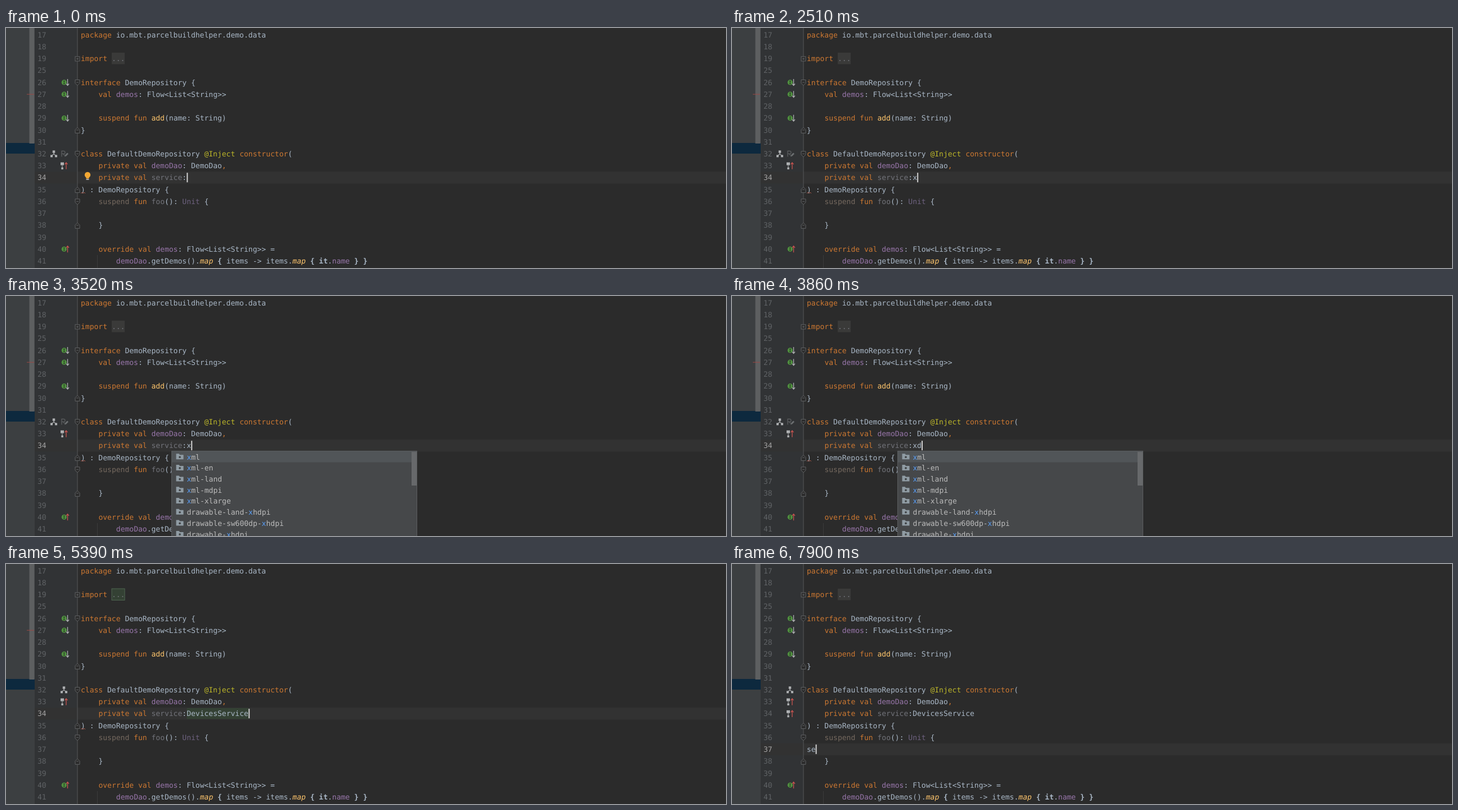
An HTML page that plays this animation: 1280 by 428 pixels, repeating every 8 s.

```html
<!DOCTYPE html>
<html lang="en">
<head>
<meta charset="utf-8">
<title>Code editor</title>
<style>
  html, body { margin: 0; width: 100%; height: 100%; overflow: hidden; background: #2b2b2b; }
  svg { display: block; width: 100vw; height: 100vh; }
  text { white-space: pre; text-rendering: geometricPrecision; }
  .code { font: 13.039px "DejaVu Sans Mono", monospace; }
  .hint { font: 8.72px "Open Sans", sans-serif; }
  .t { fill: #a9b7c6; }
  .k { fill: #cc7832; }
  .p { fill: #9876aa; }
  .f { fill: #ffc66d; }
  .a { fill: #bbb529; }
  .u { fill: #72737a; }
  .d { fill: #75695f; }
  .n { fill: #6e6280; }
  .i { fill: #ffc66d; font-style: italic; }
  .b { fill: #a9b7c6; font-weight: bold; }
  .w { fill: #bbbbbb; }
  .m { fill: #589df6; }
  .l { fill: #606366; }
  .c { fill: #a4a3a3; }
</style>
</head>
<body>
<svg id="stage" viewBox="0 0 1280 428" preserveAspectRatio="none"></svg>
<script>
const LOOP = 8000, CHAR = 7.85, LEFT = 133, PITCH = 21.24, POP_X = 294, POP_W = 437;

// Line number, indent in columns, then segments: a style letter followed by text.
const LINES = [
  [17, 0, 'kpackage |tio.mbt.parcelbuildhelper.demo.data'],
  [18], [19, 0, 'kimport '], [25],
  [26, 0, 'kinterface |tDemoRepository {'],
  [27, 4, 'kval |pdemos|t: Flow<List<String>>'],
  [28],
  [29, 4, 'ksuspend fun |fadd|t(name: String)'],
  [30, 0, 't}'], [31],
  [32, 0, 'kclass |tDefaultDemoRepository |a@Inject |kconstructor|t('],
  [33, 4, 'kprivate val |pdemoDao|t: DemoDao|k,'],
  [34, 4, 'kprivate val |uservice|t:'],
  [35, 0, 't) : DemoRepository {'],
  [36, 4, 'dsuspend |kfun |ufoo|t(): |nUnit |t{'],
  [37, 0, 't'], [38, 4, 't}'], [39],
  [40, 4, 'koverride val |pdemos|t: Flow<List<String>> ='],
  [41, 8, 'pdemoDao|t.getDemos().|imap |b{ |titems -> items.|imap |b{ it|t.|pname|b } }']
];

const FOLDERS = ['mx|wml', 'mx|wml-en', 'mx|wml-land', 'mx|wml-mdpi', 'mx|wml-xlarge',
  'wdrawable-land-|mx|whdpi', 'wdrawable-sw600dp-|mx|whdpi', 'wdrawable-|mx|whdpi'];

// Each step changes only the listed properties.
const STEPS = [
  [0, { line: 34, col: 24, caret: 1, bulb: 1, typed: '', body: '', popup: '', error: 1, usage: 0, moved: 0, linked: 0 }],
  [330, { caret: 0 }],
  [460, { bulb: 0 }],
  [860, { caret: 1 }],
  [990, { bulb: 1 }],
  [1460, { caret: 0 }],
  [1980, { caret: 1 }],
  [2510, { typed: 'x', col: 25, bulb: 0 }],
  [2990, { caret: 0, popup: 'short' }],
  [3070, { popup: 'long' }],
  [3520, { caret: 1 }],
  [3860, { typed: 'xd', col: 26 }],
  [3930, { typed: 'xde', col: 27 }],
  [4000, { popup: 'route' }],
  [4200, { typed: 'xdev', col: 28 }],
  [5060, { caret: 0 }],
  [5390, { typed: 'DevicesService', col: 38, caret: 1, popup: '', usage: 1, moved: 1 }],
  [5720, { linked: 1 }],
  [5850, { error: 0 }],
  [6380, { caret: 0 }],
  [6510, { bulb: 1 }],
  [6840, { line: 35, col: 20, caret: 1, bulb: 0, usage: 0 }],
  [6980, { line: 36, col: 29 }],
  [7080, { line: 37, col: 0 }],
  [7770, { body: 's', col: 1 }],
  [7900, { body: 'se', col: 2 }]
];

const rowOf = number => LINES.findIndex(line => line[0] === number);
const lineY = number => 12 + PITCH * rowOf(number);
const colX = col => LEFT + col * CHAR;
const escapeText = s => s.replace(/&/g, '&amp;').replace(/</g, '&lt;').replace(/>/g, '&gt;');
const rect = (x, y, w, h, fill, extra = '') =>
  `<rect x="${x}" y="${y}" width="${w}" height="${h}" fill="${fill}" ${extra}/>`;
const path = (d, stroke, width = 1, fill = 'none') =>
  `<path d="${d}" stroke="${stroke}" stroke-width="${width}" fill="${fill}"/>`;
const circle = (x, y, r, fill) => `<circle cx="${x}" cy="${y}" r="${r}" fill="${fill}"/>`;
const at = (x, y, content) => `<g transform="translate(${x} ${y})">${content}</g>`;

function text(x, y, markup, font = 'code') {
  const spans = markup.split('|').map(s => `<tspan class="${s[0]}">${escapeText(s.slice(1))}</tspan>`);
  return `<text class="${font}" x="${x}" y="${y}">${spans.join('')}</text>`;
}

const bulb = (x, y) => at(x, y,
  circle(0, -2, 5.2, '#f2a733') + rect(-2.5, 2, 5, 2.5, '#f2a733') + rect(-2.5, 5, 5, 2, '#a9a9a9'));

const arrow = (x, up) => up
  ? path(`M${x} 6V-5M${x - 2.5} -2.5L${x} -5.5L${x + 2.5} -2.5`, '#c75450', 1.3)
  : path(`M${x} -6V5M${x - 2.5} 2.5L${x} 5.5L${x + 2.5} 2.5`, '#afb1b3', 1.3);

const member = (number, up) => at(0, lineY(number),
  circle(103.3, 0, 4.6, '#4f8f3f') + path('M102 -2.4H104.6M103.3 -2.4V2.4M102 2.4H104.6', '#253522') + arrow(109.5, up));

const injected = number => at(0, lineY(number),
  rect(97, -6, 6, 5, '#afb1b3') + path('M100 -1V4', '#afb1b3') + rect(98.3, 3, 3.5, 3.5, '#afb1b3') + arrow(107, true));

const hierarchy = x => at(x, lineY(32),
  rect(-2.2, -6, 4.4, 4.4, '#afb1b3') + path('M0 -2V0L-4 4M0 0L4 4', '#afb1b3', 1.2) +
  rect(-6, 2, 4, 4, '#afb1b3') + rect(2, 2, 4, 4, '#afb1b3'));

const editMark = () => at(104, lineY(32),
  path('M-5 5V-5H-2Q1 -5 1 -2.5Q1 0 -2 0H-5M-2 0L0 3', '#5c5f61', 1.3) +
  path('M0 5L1 2L5 -2L7 0L3 4Z', 'none', 0, '#6b6e70'));

function foldMark(number, down) {
  const s = down ? 1 : -1;
  return at(127, lineY(number) + .5,
    path(`M-4 ${-5 * s}H4V${s}L0 ${5 * s}L-4 ${s}Z`, '#616365', 1, '#2b2b2b') + path('M-2 -.5H2', '#616365'));
}

function background(s) {
  const y = lineY(s.line);
  return rect(0, 0, 1280, 428, '#2b2b2b') + rect(51, 0, 76, 428, '#313335') +
    rect(0, 0, 51, 428, '#3c3f41') + rect(0, 205, 51, 19, '#0d293e') + rect(41.5, 0, 9, 206, '#5d5f60') +
    (s.error ? rect(37, 117.7, 13, 1, '#9c4844') : '') +
    rect(51, y - 10.7, 1229, 21.2, '#323232') +
    path('M127 0V428', '#56585a') + path('M162.5 405V428', '#3b3b3b');
}

function gutter(s) {
  const minus = at(127, lineY(19) + .5,
    rect(-4, -4, 8, 8, '#2b2b2b', 'stroke="#616365"') + path('M-2 0H2M0 -2V2', '#616365'));
  return [26, 27, 29].map(n => member(n, false)).join('') + member(40, true) +
    hierarchy(s.moved ? 103 : 85) + (s.moved ? '' : editMark()) +
    injected(33) + (s.linked ? injected(34) : '') + minus +
    [26, 32, 36].map(n => foldMark(n, true)).join('') +
    [30, 35, 38].map(n => foldMark(n, false)).join('');
}

function code(s) {
  const added = { 34: s.typed, 37: s.body };
  const fold = rect(188, 44, 23, 20.5, s.usage ? '#344134' : '#3a3a39', s.usage ? 'stroke="#4f6650"' : '') +
    text(colX(7), lineY(19) + 4.6, 'u...');
  const usage = s.usage ? rect(colX(24), lineY(34) - 10, 14 * CHAR, 19.5, '#344134') : '';
  const rows = LINES.map(([number, indent, markup]) => {
    const y = lineY(number) + 4.6;
    return text(56, y, (number === s.line ? 'c' : 'l') + number) +
      (markup ? text(colX(indent), y, markup + (added[number] || '')) : '');
  });
  const wave = s.error ? path('M133 295l2 -2l2 2l2 -2l2 2', '#a6584b') : '';
  return fold + usage + rows.join('') + wave;
}

const folder = y => at(309, y,
  path('M-6.5 -5H-1.5L0 -3H6.5V5H-6.5Z', 'none', 0, '#8f9ba3') + circle(0, 1, 1.8, '#3c3f41'));

function hint(y) {
  const dots = [-5, -1, 3].map(d => circle(720, y + d, 1.3, '#c0c2c4')).join('');
  return text(305, y + 3, 'lPress Ctrl+. to choose the selected (or first) suggestion and insert a dot afterwards', 'hint')
    .replace('class="l"', 'fill="#8c8c8c"') + text(643, y + 3, 'mNext Tip', 'hint') + dots;
}

function popup(s) {
  if (!s.popup) return '';
  const height = { short: 122, long: 170, route: 44 }[s.popup];
  const frame = rect(POP_X + .5, 276.5, POP_W - 1, height - 1, '#46484a', 'stroke="#5b5d5f"') +
    rect(POP_X + 1, 277, POP_W - 2, 19.5, '#515558');
  if (s.popup === 'route') {
    const match = s.typed.slice(1), rest = 'device_id'.slice(match.length);
    return frame + circle(309, 286.5, 7, '#b0727a') +
      '<text x="309" y="290.2" text-anchor="middle" fill="#3a2d30" style="font:10px Roboto,sans-serif">P</text>' +
      text(colX(24), 291.3, 'mx') +
      text(colX(26), 291.3, `w/lighting/switches/{|m${match}|w${rest}}/{value}/timer/{…`) +
      hint(308) + bulb(700, 306.5);
  }
  const rows = FOLDERS.slice(0, s.popup === 'short' ? 5 : 8).map((markup, i) => {
    const y = 287 + i * 19.7;
    return folder(y - .8) + text(colX(24), y + 4.6, markup);
  });
  return frame + rows.join('') + (s.popup === 'short' ? hint(386.7) : rect(721, 278, 9, 60, '#67696b'));
}

function draw(s) {
  const caret = s.caret ? rect(colX(s.col) - .1, lineY(s.line) - 8.7, 2, 17, '#d0d0d0') : '';
  return background(s) + gutter(s) + code(s) + (s.bulb ? bulb(145, 264) : '') + popup(s) + caret;
}

const stage = document.getElementById('stage');
const start = performance.now();
let shown = -1;

function tick() {
  const time = (performance.now() - start) % LOOP;
  const count = STEPS.filter(step => step[0] <= time).length;
  if (count !== shown) {
    shown = count;
    stage.innerHTML = draw(Object.assign({}, ...STEPS.slice(0, count).map(step => step[1])));
  }
  requestAnimationFrame(tick);
}
tick();
</script>
</body>
</html>
```
